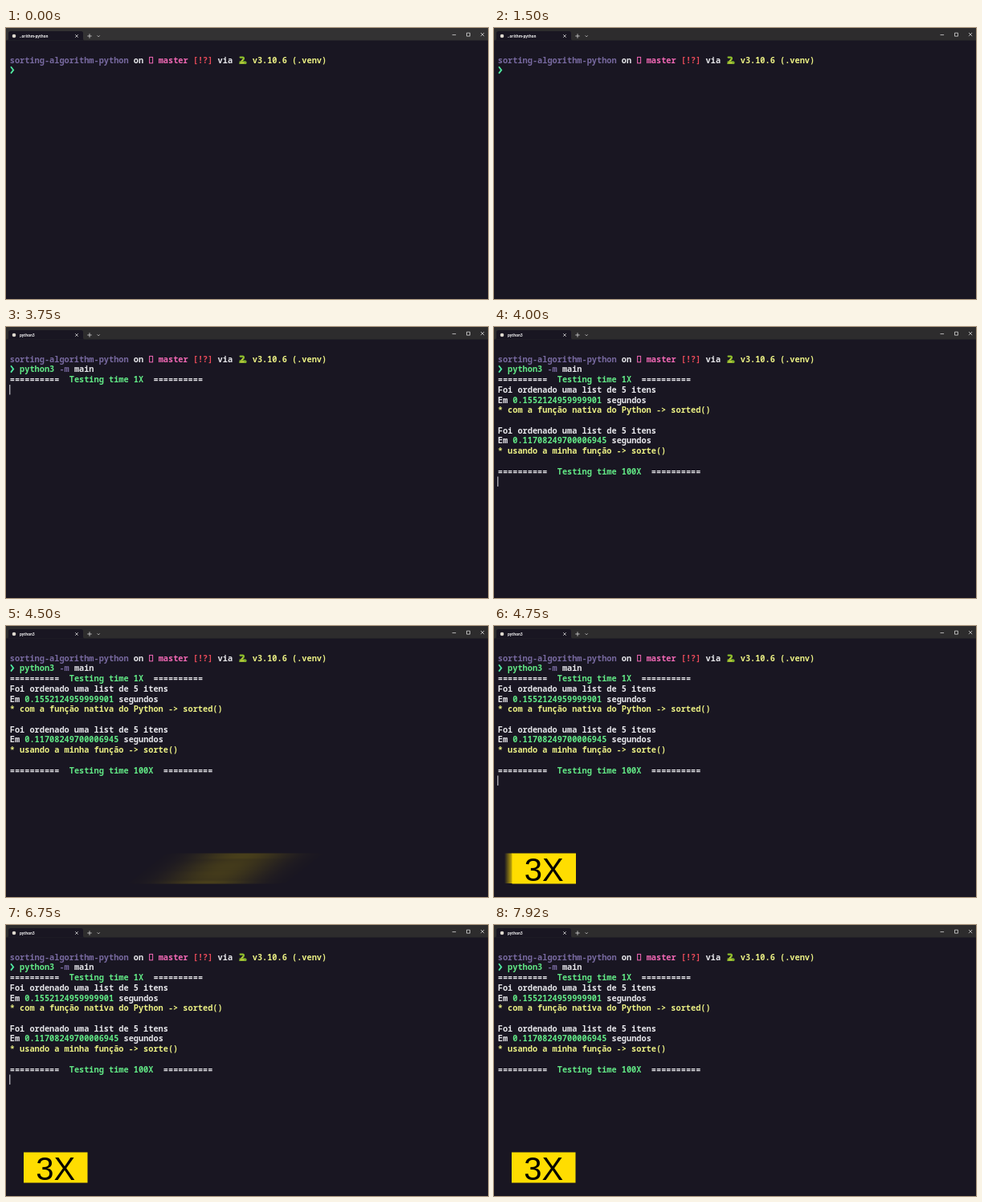
Write an HTML page that moves like this. It is 600 px wide and 338 px high and loops after 8 s.

```html
<!DOCTYPE html>
<html lang="pt">
<head>
<meta charset="utf-8">
<title>Terminal</title>
<style>
html, body { margin: 0; width: 100%; height: 100%; overflow: hidden; background: #191622; }
svg { display: block; width: 600px; height: 338px; }
#screen text { font: 600 10.27px "Noto Sans Mono", "DejaVu Sans Mono", monospace; font-variant-ligatures: none; }
.tab { font: 700 4.5px "Open Sans", sans-serif; fill: #f4f4f4; }
.badge { font: 40px "Liberation Sans", Arial, sans-serif; text-anchor: middle; }
.line { fill: none; stroke: #d6d6d6; stroke-width: .8; }
</style>
</head>
<body>
<svg viewBox="0 0 600 338">
  <defs>
    <filter id="blur" filterUnits="userSpaceOnUse" x="-300" y="270" width="800" height="64">
      <feGaussianBlur id="dev" stdDeviation="0 0"/>
    </filter>
    <linearGradient id="fade">
      <stop offset="0" stop-color="#ffdd00" stop-opacity="0"/>
      <stop offset="1" stop-color="#ffdd00"/>
    </linearGradient>
  </defs>
  <rect width="600" height="338" fill="#191622"/>
  <rect id="bar" width="600" height="15.5"/>
  <path d="M1 15.5Q3 15.5 3 13.5V6.5Q3 4 5.5 4H93.5Q96 4 96 6.5V13.5Q96 15.5 98 15.5Z" fill="#191622"/>
  <circle cx="10" cy="10" r="2.3" fill="#ded9cf"/>
  <text id="title" class="tab" x="17" y="11.6"></text>
  <path class="line" d="M86.2 8.2l3.6 3.6m0-3.6l-3.6 3.6M101.3 10h5.4M104 7.3v5.4M113.7 9.4l1.5 1.5 1.5-1.5M555.5 8.6h4.6M573.5 6.2h4v4h-4zM591 6l4.2 4.2m0-4.2L591 10.2"/>
  <g id="screen"></g>
  <g id="prompt">
    <rect x="178.6" y="36.4" width="4" height="7.4" fill="none" stroke="#f268b5" stroke-width="1"/>
    <g fill="none" stroke-linecap="round">
      <path d="M291.6 36.6h3.2q1.6 .4 1 2l-2 2.4" stroke="#8ebf2c" stroke-width="2.2"/>
      <path d="M291.4 42.2h5.6q2.4 .3 1.4 1.8h-7.4" stroke="#7fae2a" stroke-width="2"/>
      <path d="M294.6 39.6l-1.6 2.1M292 43.4h4" stroke="#e4d64a" stroke-width="1"/>
    </g>
    <path d="M6 48.2l3.2 4.2L6 56.6" fill="none" stroke="#50e8a0" stroke-width="1.8"/>
  </g>
  <rect id="cursor" width="1" height="12.4" fill="#e1e1e6"/>
  <g id="badge">
    <rect x="22" y="283.5" width="79.5" height="38" fill="#ffdd00"/>
    <text class="badge" x="61.7" y="318">3X</text>
  </g>
  <rect id="trail" x="13" y="283.5" width="10" height="37.5" fill="url(#fade)"/>
</svg>
<script>
const LOOP = 8000, COL = 6.162, ROW = 12.73;
const $ = id => document.getElementById(id);
const C = {
  path: '#77699f', white: '#e6e6ea', pink: '#f268b5', red: '#e84a59',
  yellow: '#ebf084', green: '#62e986', ghost: '#686279'
};
const runs = [];

// Places a run of text on the character grid, visible from one time to another.
function put(row, col, text, color, from = 0, to = LOOP) {
  const el = document.createElementNS('http://www.w3.org/2000/svg', 'text');
  el.setAttribute('x', 4.8 + col * COL);
  el.setAttribute('y', 43.6 + row * ROW);
  el.setAttribute('fill', C[color]);
  el.textContent = text;
  $('screen').append(el);
  runs.push({ el, from, to });
}

function header(row, label, from) {
  put(row, 0, '==========', 'white', from);
  put(row, 12, label, 'green', from);
  put(row, 14 + label.length, '==========', 'white', from);
}

function result(row, time, note, from) {
  put(row, 0, 'Foi ordenado uma list de 5 itens', 'white', from);
  put(row + 1, 0, 'Em', 'white', from);
  put(row + 1, 3, time, 'green', from);
  put(row + 1, 4 + time.length, 'segundos', 'white', from);
  put(row + 2, 0, note, 'yellow', from);
}

put(0, 0, 'sorting-algorithm-python', 'path');
put(0, 25, 'on', 'white');
put(0, 30, 'master', 'pink');
put(0, 37, '[!?]', 'red');
put(0, 42, 'via', 'white');
put(0, 49, 'v3.10.6 (.venv)', 'yellow');

put(1, 2, 'cl', 'green', 1920, 2000);
put(1, 4, 'ear', 'ghost', 1920, 2000);
put(1, 2, 'clear', 'green', 2000, 2580);
put(1, 2, 'py', 'green', 2580, 3170);
put(1, 4, 'thon3 -m main', 'ghost', 2580, 3170);
put(1, 2, 'python3', 'green', 3170);
put(1, 10, '-m', 'path', 3170);
put(1, 13, 'main', 'white', 3170);

header(2, 'Testing time 1X', 3750);
result(3, '0.1552124959999901', '* com a função nativa do Python -> sorted()', 3920);
result(7, '0.11708249700006945', '* usando a minha função -> sorte()', 4000);
header(11, 'Testing time 100X', 4000);

// [start, column, row]; column -1 hides the cursor
const cursorSteps = [
  [0, -1, 0], [920, 2, 1], [1500, -1, 0], [1920, 4, 1], [2000, 7, 1], [2500, -1, 0],
  [2580, 4, 1], [3170, 17, 1], [3750, 0, 3], [3920, 0, 7], [4000, 0, 12], [4420, -1, 0]
];
const FAST = 4745, BLINK = 167;

function cursorAt(t) {
  if (t >= FAST) return [t, Math.floor((t - FAST) / BLINK) % 2 ? -1 : 0, 12];
  return cursorSteps.findLast(s => s[0] <= t);
}

// [time, shift, skew, blur, opacity, trail]
const slide = [
  [4330, 470, -56, 40, 0, 0],
  [4420, 350, -55, 38, .12, 0],
  [4500, 214, -52, 30, .24, 0],
  [4580, 80, -36, 22, .6, 0],
  [4670, -7, -10, 8, .92, .3],
  [4750, .5, 0, 0, 1, .8],
  [4840, 0, 0, 0, 1, 0]
];

function slideAt(t) {
  const i = slide.findIndex(k => k[0] > t);
  if (i === 0) return slide[0];
  if (i < 0) return slide[slide.length - 1];
  const a = slide[i - 1], b = slide[i], p = (t - a[0]) / (b[0] - a[0]);
  return a.map((v, n) => v + (b[n] - v) * p);
}

function draw(t) {
  for (const r of runs) r.el.style.display = t >= r.from && t < r.to ? '' : 'none';
  $('bar').setAttribute('fill', t < 1000 ? '#333233' : '#2d2c2d');
  $('title').textContent = t < 3750 ? '..orithm-python' : 'python3';

  const [, col, row] = cursorAt(t);
  $('cursor').style.display = col < 0 ? 'none' : '';
  $('cursor').setAttribute('x', 4.3 + Math.max(col, 0) * COL);
  $('cursor').setAttribute('y', 33.8 + row * ROW);

  const [, shift, skew, blur, opacity, trail] = slideAt(t), badge = $('badge');
  badge.setAttribute('transform', `translate(${shift} 302) skewX(${skew}) translate(0 -302)`);
  badge.setAttribute('opacity', opacity);
  badge.setAttribute('filter', blur > .1 ? 'url(#blur)' : 'none');
  $('dev').setAttribute('stdDeviation', `${blur} 0`);
  $('trail').setAttribute('opacity', trail);
}

function tick() {
  draw(performance.now() % LOOP);
  requestAnimationFrame(tick);
}
tick();
</script>
</body>
</html>
```
